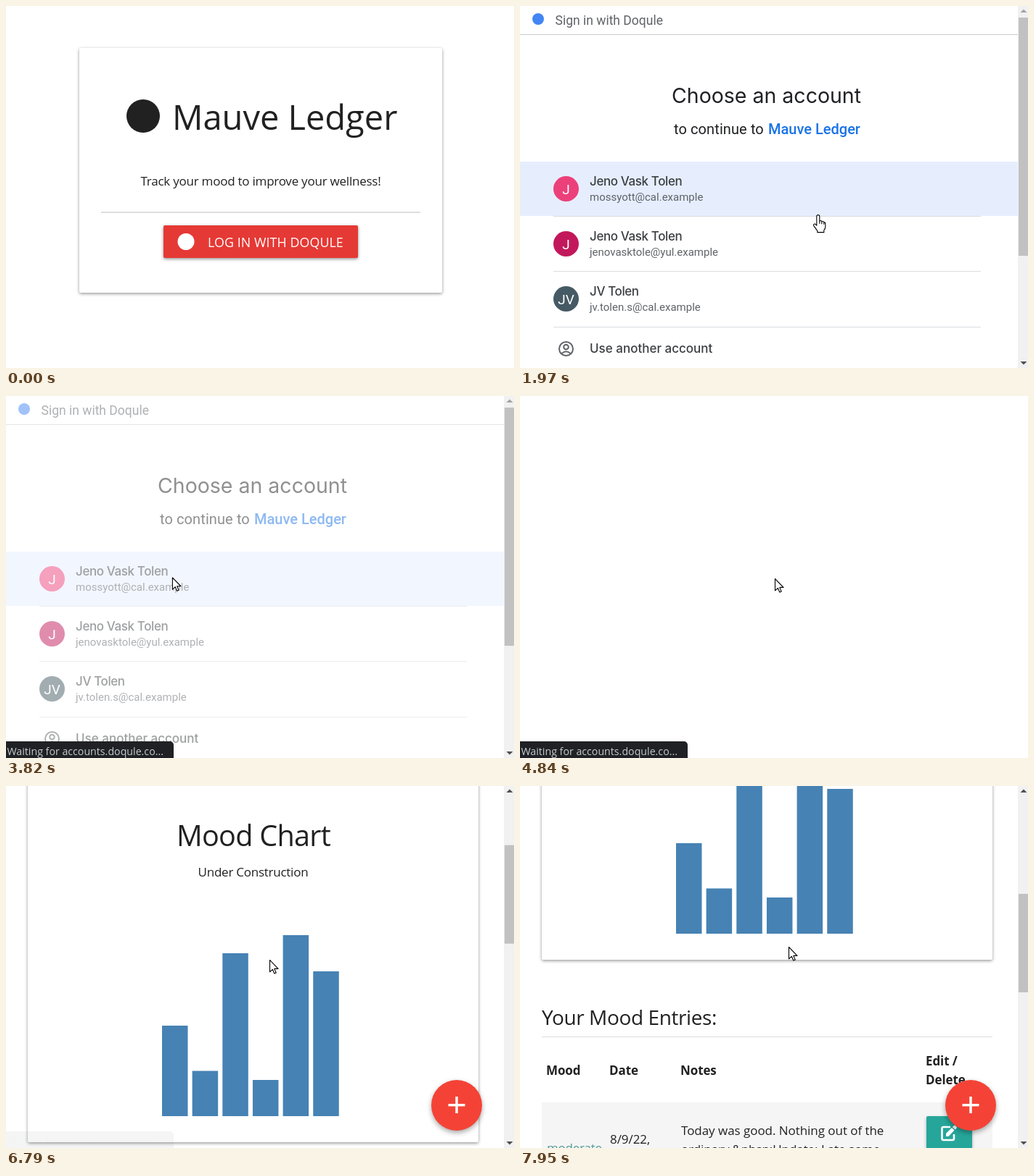
Animation of 700x500 px, one loop 8000 ms. Source, as an HTML page with a canvas:

```html
<!DOCTYPE html>
<html lang="en">
<head>
<meta charset="utf-8">
<style>
html, body { margin: 0; width: 100%; height: 100%; overflow: hidden; background: #fff; }
canvas { display: block; }
</style>
</head>
<body>
<canvas id="stage" width="700" height="500"></canvas>
<script>
const ctx = document.getElementById('stage').getContext('2d');
const LOOP = 8000;
const INK = '#212121', GREY = '#5f6368';
const SANS = '"Open Sans", sans-serif';
const ROBOTO = 'Roboto, sans-serif';
const INTER = 'Inter, sans-serif';

// Keyframes: [time, value, value, ...]
const cursorPath = [
  [320, 603, 484], [1020, 384, 306], [1150, 384, 306], [1290, 383.5, 320],
  [1560, 383.5, 320], [2320, 434, 262], [3010, 241.5, 252], [3150, 228, 250],
  [3820, 228, 250], [3950, 346, 296], [4220, 346, 296], [4510, 351, 252],
  [5360, 351, 252], [5430, 361, 244], [6310, 361, 244], [6790, 363, 240],
  [7070, 365, 235], [7270, 365, 235], [7620, 370, 223], [7950, 370, 222]
];
const scrollPath = [
  [5770, 0], [6040, 120], [6250, 120], [6520, 246], [6800, 246],
  [7070, 372], [7210, 372], [7620, 492], [7900, 492], [7950, 498]
];
const T = { status: 1150, click: 1560, chooser: 1850, fade: 3200, waiting: 3820,
            blank: 4840, dashboard: 4970, chart: 6450, statusOut: 6600, statusGone: 6800 };

const clamp = v => Math.max(0, Math.min(1, v));
const progress = (t, from, to) => clamp((t - from) / (to - from));
const smooth = p => p * p * (3 - 2 * p);

function sample(keys, t, ease = p => p) {
  const i = keys.findIndex(k => k[0] > t);
  if (i === 0) return keys[0].slice(1);
  if (i < 0) return keys[keys.length - 1].slice(1);
  const a = keys[i - 1], b = keys[i];
  const p = ease(progress(t, a[0], b[0]));
  return a.slice(1).map((v, j) => v + (b[j + 1] - v) * p);
}

function rect(x, y, w, h, color) {
  ctx.fillStyle = color;
  ctx.fillRect(x, y, w, h);
}

function rounded(x, y, w, h, r, color) {
  ctx.fillStyle = color;
  ctx.beginPath();
  ctx.roundRect(x, y, w, h, r);
  ctx.fill();
}

function disc(x, y, r, color) {
  ctx.fillStyle = color;
  ctx.beginPath();
  ctx.arc(x, y, r, 0, 7);
  ctx.fill();
}

function text(str, x, y, size, { font = SANS, weight = 400, color = INK, align = 'left', gap = 0 } = {}) {
  ctx.font = `${weight} ${size}px ${font}`;
  ctx.letterSpacing = gap + 'px';
  ctx.textAlign = align;
  ctx.fillStyle = color;
  ctx.fillText(str, x, y);
}

function withShadow(blur, dy, alpha, draw) {
  ctx.save();
  ctx.shadowColor = `rgba(0,0,0,${alpha})`;
  ctx.shadowBlur = blur;
  ctx.shadowOffsetY = dy;
  draw();
  ctx.restore();
}

const card = (x, y, w, h) => withShadow(4.5, 1.5, 0.42, () => rounded(x, y, w, h, 2, '#fff'));

function triangle(x, y, dir, color) {
  ctx.fillStyle = color;
  ctx.beginPath();
  ctx.moveTo(x - 4.5, y + 2 * dir);
  ctx.lineTo(x + 4.5, y + 2 * dir);
  ctx.lineTo(x, y - 2.5 * dir);
  ctx.fill();
}

function scrollbar(top, height) {
  rect(686, 0, 14, 500, '#f1f1f1');
  rect(687, top, 13, height, '#c1c1c1');
  triangle(694, 7, 1, top > 17 ? '#505050' : '#a3a3a3');
  triangle(694, 493, -1, '#505050');
}

function status(str, width, alpha = 1) {
  ctx.globalAlpha = alpha;
  rounded(0, 477, width, 23, [0, 5, 0, 0], '#202124');
  text(str, 1.5, 496, 14.2, { color: '#c4cbd1' });
  ctx.globalAlpha = 1;
}

function login(t, overButton) {
  card(101, 58, 500, 338);
  disc(189, 152, 23, INK);
  text('Mauve Ledger', 229, 171, 47);
  text('Track your mood to improve your wellness!', 351, 248, 17, { align: 'center', gap: -0.24 });
  rect(131, 284, 440, 2, '#ddd');
  withShadow(4, overButton ? 2.5 : 1.5, 0.45, () => rounded(217, 303, 268, 45, 2, '#e53935'));
  const wave = progress(t, T.click, T.chooser);
  if (wave > 0) {
    ctx.save();
    ctx.beginPath();
    ctx.rect(217, 303, 268, 45);
    ctx.clip();
    disc(385, 321, 180 * wave, `rgba(255,255,255,${0.35 * (1 - wave)})`);
    ctx.restore();
  }
  disc(248, 325.5, 11.5, '#fff');
  text('LOG IN WITH DOQULE', 278, 333, 17.8, { color: '#fff', gap: 0.1 });
  if (t >= T.status) status('localhost:3000/auth/doqule', 194);
}

const accounts = [
  ['Jeno Vask Tolen', 'mossyott@cal.example', 'J', '#ec407a'],
  ['Jeno Vask Tolen', 'jenovasktole@yul.example', 'J', '#c2185b'],
  ['JV Tolen', 'jv.tolen.s@cal.example', 'JV', '#455a64']
];

function personIcon(x, y) {
  ctx.strokeStyle = GREY;
  ctx.lineWidth = 2;
  ctx.beginPath();
  ctx.arc(x, y, 9.5, 0, 7);
  ctx.moveTo(x + 3.3, y - 2.5);
  ctx.arc(x, y - 2.5, 3.3, 0, 7);
  ctx.moveTo(x - 6, y + 6.5);
  ctx.quadraticCurveTo(x, y + 1, x + 6, y + 6.5);
  ctx.stroke();
}

function chooser(t, y) {
  const hovered = t < T.waiting && y > 290 ? 1 : 0;
  disc(25, 18, 8, '#4285f4');
  text('Sign in with Doqule', 48.5, 26, 17.5, { font: ROBOTO, color: GREY });
  rect(0, 39, 686, 1, '#c9cbce');
  text('Choose an account', 339.5, 133.5, 28.5, { font: INTER, color: '#202124', align: 'center' });
  text('to continue to', 212, 177, 20, { font: ROBOTO, color: '#202124', gap: 0.1 });
  text('Mauve Ledger', 342, 177, 20, { font: ROBOTO, weight: 500, color: '#1a73e8' });
  rect(0, 215 + 76 * hovered, 686, 75, '#e6eefe');
  accounts.forEach(([name, mail, initials, color], i) => {
    const top = 215 + 76 * i;
    disc(63.5, top + 37.5, 17.5, color);
    text(initials, 63.5, top + 44.5, 19, { font: ROBOTO, color: '#fff', align: 'center' });
    text(name, 96, top + 33, 17, { font: INTER, weight: 500, color: '#3c4043', gap: -0.4 });
    text(mail, 96, top + 54, 15, { font: ROBOTO, color: GREY });
    rect(46, top + (i < 2 ? 75 : 76), 589, 1, '#dadce0');
  });
  personIcon(63.5, 473.5);
  text('Use another account', 96, 479, 17, { font: INTER, weight: 500, color: '#3c4043' });
  rect(0, 0, 686, 500, `rgba(255,255,255,${0.5 * progress(t, T.fade, 3550)})`);
  scrollbar(16, 329);
  if (t >= T.waiting) waiting(t);
}

const waiting = t =>
  status('Waiting for accounts.doqule.co...', 231, 1 - progress(t, T.statusOut, T.statusGone));

function editButton(x, y) {
  withShadow(4, 2, 0.3, () => rounded(x, y, 63, 45, 2, '#26a69a'));
  ctx.save();
  ctx.translate(x + 20, y + 12);
  ctx.strokeStyle = '#fff';
  ctx.lineWidth = 2.6;
  ctx.lineJoin = 'round';
  ctx.stroke(new Path2D('M13 3H3.5Q1.5 3 1.5 5V19Q1.5 21 3.5 21H16Q18 21 18 19V13'));
  ctx.fillStyle = '#fff';
  ctx.fill(new Path2D('M7 16V12L15 4L18.5 7.5L10.5 16ZM16 3L18 1Q19 0 20 1L22 3Q22.5 4 21.5 4.8L19.6 6.6Z'));
  ctx.restore();
}

function dashboard(t) {
  const [scroll] = sample(scrollPath, t, smooth);
  const hasChart = t >= T.chart;
  ctx.save();
  ctx.translate(0, -scroll);
  text('Welcome Jeno Vask!', 31, 146, 49);
  rect(30, 171, 621, 1, '#ddd');
  text('Dashboard', 29, 217, 28, { gap: -0.4 });
  card(30, 234, 621, hasChart ? 504 : 379);
  text('Mood Chart', 341, 329, 39.5, { align: 'center', gap: -0.7 });
  text('Under Construction', 340.5, 371, 17, { align: 'center', gap: -0.24 });
  if (hasChart) {
    [10, 5, 18, 4, 20, 16].forEach((v, i) =>
      rect(215 + 41.65 * i, 702 - 12.5 * v, 35.5, 12.5 * v, 'steelblue'));
    entries();
  }
  ctx.restore();

  withShadow(7, 3, 0.35, () => disc(621, 441, 35, '#f44336'));
  rect(609.5, 439, 23, 3.4, '#fff');
  rect(619.3, 429, 3.4, 23, '#fff');
  if (hasChart) scrollbar(16 + scroll * 0.267, 136);
  else scrollbar(16 + scroll * 0.2917, 146);
  if (t < T.statusGone) waiting(t);
}

function entries() {
  const bold = { weight: 700, gap: -0.1 }, body = { gap: -0.06 };
  text('Your Mood Entries:', 30, 828, 28, { gap: -0.4 });
  rect(30, 844, 621, 1, '#ddd');
  text('Mood', 36, 897, 17, bold);
  text('Date', 123, 897, 17, bold);
  text('Notes', 221, 897, 17, bold);
  text('Edit /', 559, 884, 17, bold);
  text('Delete', 559, 910, 17, bold);
  rect(30, 935, 621, 130, '#f5f5f5');
  text('moderate', 37, 1004, 17, { color: '#4f9a97', gap: -0.24 });
  text('8/9/22,', 124, 992, 17, body);
  text('Today was good. Nothing out of the', 222, 980, 17, body);
  text('ordinary.&nbsp;Update: Late some', 222, 1006, 17, body);
  editButton(560, 954);
}

const arrow = new Path2D('M.5 .5V16.8L4.3 13.3L6.8 19L9.2 18L6.8 12.4H12Z');
const hand = new Path2D('M-2 2Q-2 0 0 0Q2 0 2 2V8Q4 7 5 9Q7 8 8 10Q10 10 10 12V16Q10 19 8 21V24H-1V22L-6 15Q-7 12 -4 12.5L-2 14.5Z');
const knuckles = new Path2D('M2 8V12M5 9V12.5M8 10V13');

function cursor(x, y, pointing) {
  ctx.save();
  ctx.translate(x, y);
  ctx.fillStyle = '#fff';
  ctx.strokeStyle = '#000';
  ctx.lineWidth = 1.1;
  ctx.lineJoin = 'round';
  const shape = pointing ? hand : arrow;
  ctx.fill(shape);
  ctx.stroke(shape);
  if (pointing) ctx.stroke(knuckles);
  ctx.restore();
}

function draw(t) {
  const [x, y] = sample(cursorPath, t);
  const overButton = t < T.chooser && x < 485 && y < 348;
  rect(0, 0, 700, 500, '#fff');
  if (t < T.chooser) login(t, overButton);
  else if (t < T.blank) chooser(t, y);
  else if (t < T.dashboard) waiting(t);
  else dashboard(t);
  if (t >= 320) cursor(x, y, overButton || (t >= T.chooser && t < T.waiting));
}

function frame() {
  draw(performance.now() % LOOP);
  requestAnimationFrame(frame);
}
frame();
</script>
</body>
</html>
```
